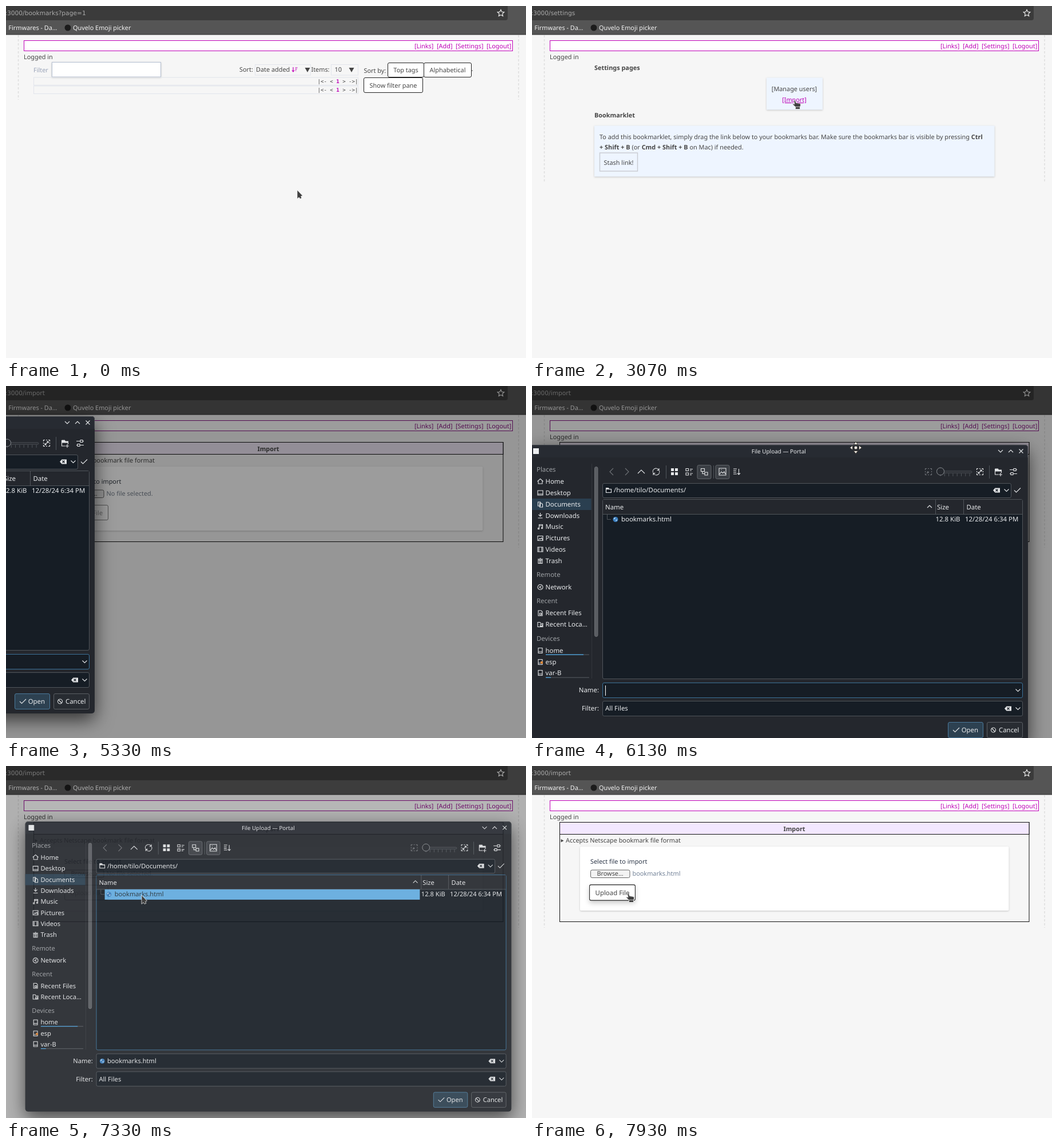
An HTML page for the animation above (8 s loop, 909 by 616 pixels).

```html
<!DOCTYPE html>
<html lang="en">
<head>
<meta charset="utf-8">
<title>Bookmark import</title>
<style>
html, body { margin: 0; width: 100%; height: 100%; overflow: hidden; background: #f6f6f6; }
svg { display: block; font: 10.88px "Noto Sans", sans-serif; fill: #454545; text-rendering: geometricPrecision; }
.url { font: 10.67px "DejaVu Sans", sans-serif; fill: #aaa; }
.mono { font: 9.07px "DejaVu Sans Mono", monospace; }
.b { font-weight: 700; }
.m { fill: #bd00b5; }
.line { fill: none; stroke: #e2e5ec; }
.btn { fill: #fff; stroke: #222; }
.card { filter: drop-shadow(0 1px 1.5px #0003); }
#dialog { font-size: 11.4px; fill: #e9ebed; }
#dialog .dim { fill: #9da0a4; }
.ic { fill: none; stroke: #e4e6e8; stroke-width: 1.1; }
.off { opacity: .4; }
.solid { fill: #e4e6e8; stroke: none; }
.view { fill: #161d25; stroke: #50555b; }
.focus { stroke: #3c7299; }
.sep { stroke: #50555b; fill: none; }
</style>
</head>
<body>
<svg id="stage" width="909" height="616" viewBox="0 0 909 616"></svg>
<script>
const text = (x, y, s, o = '') => `<text x="${x}" y="${y}" ${o}>${s}</text>`;
const rect = (x, y, w, h, o = '') => `<rect x="${x}" y="${y}" width="${w}" height="${h}" ${o}/>`;
const path = (d, o = '') => `<path d="${d}" ${o}/>`;
const icon = (x, y, d, cls = '') => path(d, `transform="translate(${x} ${y})" class="ic ${cls}"`);
const group = (id, ...parts) => `<g id="${id}">${parts.join('')}</g>`;
const end = 'text-anchor="end"', mid = 'text-anchor="middle"', magenta = 'class="m"';

const shape = {
  down: 'M-4-2L0 2 4-2', up: 'M-4 2L0-2 4 2', cross: 'M-3.5-3.5L3.5 3.5M3.5-3.5L-3.5 3.5',
  check: 'M-5.5 0L-2 3.5 5.5-4', arrowDown: 'M-4.5-4H4.5L0 4z',
  folder: 'M-4.5-4h4l1 2h4v6h-9z', page: 'M-3.5-4.5h5l2 2v7h-7z',
  disk: 'M-3.5-4.5h7v9h-7zM-3.5 2h7', no: 'M-4 0a4 4 0 1 0 8 0a4 4 0 1 0-8 0M-3-3L3 3',
  corners: 'M-5.5-3v-2.5h2.5M-1-5.5h2M3-5.5h2.5v2.5M5.5-1v2M5.5 3v2.5h-2.5M1 5.5h-2M-3 5.5h-2.5v-2.5M-5.5 1v-2'
};
const clear = (x, y) => icon(x, y, 'M-6 0L-2.5-4H6V4H-2.5z', 'solid') +
  path('M-1.5-2l4 4m0-4l-4 4', `transform="translate(${x} ${y})" stroke="#1b222a" stroke-width="1.2"`);
const globe = (x, y) => `<circle cx="${x}" cy="${y}" r="4.5" fill="#3b7fc0"/>` +
  path('M-3-2q2-2 3-1l-1 2-2 1zM0 1l3-1q0 2-2 3z', `transform="translate(${x} ${y})" fill="#b9d8f0"`);
const edges = bottom => path(`M21.5 51V${bottom}M896 51V${bottom}`, 'stroke="#dcdcdc" stroke-width="1.4" stroke-dasharray="4 3"');

const chrome = group('chrome',
  rect(0, 0, 909, 50, 'fill="#555"'),
  path('M0 0H877V21q0 4-4 4H0z', 'fill="#3b3b3b"'),
  rect(0, 49.5, 909, 1, 'fill="#2d2d2d"'),
  text(-1.6, 16, '', 'id="url" class="url"'),
  path('M865 6.5l1.8 3.8 4 .5-3 2.8.8 4-3.6-2-3.6 2 .8-4-3-2.8 4-.5z', 'fill="none" stroke="#eee" stroke-width="1.2"'),
  `<g fill="#f4f4f4">${text(-4, 42, '‹')}${text(4.3, 42, 'Firmwares - Da…')}${text(117, 42, 'Quvelo Emoji picker')}</g>`,
  '<circle cx="108" cy="38" r="5.5" fill="#1c1c1c"/>');

const nav = rect(31.5, 60.5, 854, 18, 'fill="#fff" stroke="#c000b8"') +
  [[714, 'Links'], [753, 'Add'], [786, 'Settings'], [840, 'Logout']]
    .map(([x, s]) => text(x, 74, `[${s}]`, `${magenta} id="nav${s}"`)).join('') +
  text(31, 93, 'Logged in');

const pager = y => rect(48.5, y, 567, 13.5, 'class="line"') +
  text(615.5, y + 9.5, '|&lt;- &lt; <tspan class="m b">1</tspan> &gt; -&gt;|', `class="mono" ${end}`);
const button = (x, y, w, h, s) => rect(x, y, w, h, 'rx="2.5" class="btn"') + text(x + w / 2, y + h / 2 + 4, s, mid);

const bookmarks = group('bookmarks', edges(164),
  text(48, 116, 'Filter', 'fill="#99a3b8"'),
  rect(80.5, 98.5, 190, 25.5, 'fill="#fff" stroke="#b6c0d2" class="card"'),
  text(408, 115, 'Sort:'), rect(435.5, 102.5, 97, 18.5, 'class="line"'), text(437, 115, 'Date added'),
  path('M502 107v8m-2-2.5l2 2.5 2-2.5M505.5 108h4m-4 2.5h3m-3 2.5h2', 'fill="none" stroke="#c000b8" stroke-width="1.2"'),
  path(shape.arrowDown, 'transform="translate(527 112)"'),
  text(533.5, 115, 'Items:'), rect(568.5, 102.5, 47, 18.5, 'class="line"'), text(574.5, 115, '10'),
  path(shape.arrowDown, 'transform="translate(604 112)"'),
  pager(125), pager(140),
  text(625.5, 116.5, 'Sort by:'), text(813, 116, '-'),
  button(667.5, 99.5, 63, 25, 'Top tags'), button(730.5, 99.5, 83, 25, 'Alphabetical'),
  button(625.5, 125.5, 103, 26, 'Show filter pane'));

const bold = s => `<tspan class="b">${s}</tspan>`;
const settings = group('settings', edges(308),
  text(109, 112, 'Settings pages', 'class="b"'),
  rect(410, 125.5, 98, 56, 'fill="#eef5ff" class="card"'),
  text(458.5, 149, '[Manage users]', mid), text(458.5, 168, '[Import]', `${magenta} id="importLink" ${mid}`),
  text(109, 195, 'Bookmarklet', 'class="b"'),
  rect(109, 209.5, 699.5, 89, 'fill="#eef5ff" class="card"'),
  text(118, 232.5, 'To add this bookmarklet, simply drag the link below to your bookmarks bar. Make sure the bookmarks bar is visible by pressing ' + bold('Ctrl')),
  text(118, 250.5, bold('+ Shift + B') + ' (or ' + bold('Cmd + Shift + B') + ' on Mac) if needed.'),
  rect(118.5, 257, 66, 32, 'fill="none" stroke="#c9cbd0" stroke-width="1.4"'), text(151.5, 277.5, 'Stash link!', mid));

const importPage = group('import', edges(283),
  rect(48.5, 98.5, 820.5, 174, 'fill="none" stroke="#111"'),
  rect(48.5, 98.5, 820.5, 21, 'fill="#f3e8ff" stroke="#111"'),
  text(458.5, 113.5, 'Import', `class="b" ${mid}`),
  path('M50.5 128l5 2.7-5 2.7z'), text(59, 134, 'Accepts Netscape bookmark file format'),
  rect(84, 141, 749.5, 112, 'rx="2" fill="#fff" class="card"'),
  text(102, 171, 'Select file to import', 'fill="#2d3748"'),
  rect(102.5, 182, 68.5, 13.5, 'rx="2.5" fill="#f3f3f3" stroke="#666"'), text(136.5, 192.3, 'Browse…', mid),
  text(175.5, 192.3, '', 'id="fileName" fill="#718096"'),
  group('upload', rect(102.5, 208.5, 76, 26, 'rx="2.5" class="btn"'), text(140.5, 225.7, 'Upload File', mid)));

// Side bar: [baseline centre, label, icon]; no icon marks a heading.
const places = [
  [146, 'Places'], [167, 'Home', 'M-5 0L0-4.5 5 0M-3.5-1v5h7v-5'], [187, 'Desktop', 'M-4.5-4h9v8h-9zM-4.5 2h9'],
  [207, 'Documents', 'M-4-4h4v7h-4zM-1-2h3l2 2v5h-5z'], [227, 'Downloads', 'M0-5v6m-3-3l3 3 3-3M-4 4h8'],
  [246.5, 'Music', 'M-2 3v-7h6v6M-2-2h6M-4 2h2v2h-2zM2 1h2v2h-2z'], [266.5, 'Pictures', 'M-4.5-4h9v8h-9zM-3 3l2-3 1.5 1.5 2-2.5L4 3'],
  [286, 'Videos', 'M-4.5-4h9v8h-9zM-2.5-4v8M2.5-4v8'], [306, 'Trash', 'M-4.5-3h9M-1-4.5h2M-3.5-1.5h7v6h-7zM-1-1v5M1-1v5'],
  [330.5, 'Remote'], [352, 'Network', 'M-4.5 0a4.5 4.5 0 1 0 9 0a4.5 4.5 0 1 0-9 0M-2 0L2-2M-2 0L2 2'],
  [376.5, 'Recent'], [397.5, 'Recent Files', shape.page + 'M-1 0h3v3h-3z'], [417.5, 'Recent Loca…', shape.folder + 'M0 0h3v3h-3z'],
  [442, 'Devices'], [463, 'home', shape.disk], [483, 'esp', shape.disk], [502, 'var-B', shape.disk]
].map(([y, s, d]) => d ? icon(14.5, y, d) + text(23.5, y + 4, s) : text(8, y + 4, s, 'class="dim"')).join('');
const usage = (y, w) => rect(24, y, 76, 1.3, 'fill="#4c5157"') + rect(24, y, w, 1.3, 'fill="#4aa3df"');
const sep = x => path(`M${x} 139v23`, 'class="sep"');
const pressed = x => rect(x - 12, 138.5, 24, 24, 'rx="2.5" fill="#3a3e44" stroke="#62666b"');
const ticks = Array.from({ length: 8 }, (_, i) => `M${714 + 7.3 * i} 153v5`).join('');

const dialog = group('dialog',
  rect(-4, 103, 871, 520, 'rx="5" fill="#24272d" style="filter:drop-shadow(0 11px 16px #000a)"'),
  path('M-3.5 125V108q0-4.5 4.5-4.5H862q4.5 0 4.5 4.5V125', 'fill="#272b32" stroke="#3d4147"'),
  rect(2, 109, 10, 10, 'fill="#eceef0"'),
  text(431.3, 118, 'File Upload — Portal', `${mid} font-size="9.95"`),
  icon(819, 114, shape.down), icon(837, 114, shape.up), icon(855, 114, shape.cross),
  rect(-4, 197, 107.5, 20, 'fill="#2a3f50"'), places, rect(15, 482, 4, 4, 'fill="#e08a3c"'),
  usage(469.5, 66), usage(509.5, 9), path('M104.5 136V512', 'class="sep" opacity=".35"'),
  rect(109.5, 141.5, 5.5, 297, 'rx="2.7" fill="#5a5d62" stroke="#6b6e73"'),
  icon(139, 150, 'M3-6L-3 0 3 6', 'off'), icon(166, 150, 'M-3-6L3 0-3 6', 'off'), icon(191, 150, 'M-6 3L0-3 6 3'),
  icon(217, 150, 'M-5.5 1.5A5.5 5.5 0 0 1 4.5-3M5.5-1.5A5.5 5.5 0 0 1-4.5 3M5-6v3.5h-3.5M-5 6v-3.5h3.5'),
  sep(234.5), sep(317.5), sep(799.5), pressed(301), pressed(333),
  icon(249, 150, 'M-6-6h5v5h-5zM1-6h5v5h-5zM-6 1h5v5h-5zM1 1h5v5h-5z', 'solid'),
  icon(275, 150, 'M-6-5.5h4.5v4h-4.5zM-6 2h4.5v4h-4.5zM1-4.5h5M1-2h3M1 3h5M1 5.5h3'),
  icon(301, 150, 'M-5.5-5.5h6v5h-6zM1 1h5v5h-5zM-3 0v3.5h4'),
  icon(333, 150, 'M-6-6h12v12h-12zM-5 4l3-4 2.5 2.5L3 0l2 4M-2.5-3.5h1'),
  icon(358, 150, 'M-6-5h6M-6-2h5M-6 1h5M-6 4h6M3.5-5v10m-2.5-2.5L3.5 5l2.5-2.5'),
  icon(693, 150, shape.corners + 'M-3 3L0 0m-2.5 0H0v2.5', 'off'),
  path('M718 149h49q2 0 2 1.5t-2 1.5h-49' + ticks, 'class="sep" stroke="#74787d"'),
  '<circle cx="714" cy="149.5" r="6.5" fill="#24272d" stroke="#8b8f94"/>',
  icon(783, 150, shape.corners + 'M-3 3L3-3m-3 0h3v3M-3 0v3h3'),
  icon(815, 150, 'M-5.5-5h5l1 2h5v5M-5.5-5v10h6M4 2v6M1 5h6'), icon(815, 150, 'M-5.5-5h5l1 2h5v2.5h-11z', 'solid'),
  icon(841, 150, 'M-6-3.5H1M5-3.5h2M-6 3.5h2M0 3.5h7M1-5.5h4v4h-4zM-4 1.5h4v4h-4z'),
  rect(123.5, 170.5, 714, 25, 'rx="2.5" class="view"'),
  icon(134, 182.5, shape.folder), icon(134, 181, 'M-4.5-3h4l1 2h4v1h-9z', 'solid'),
  text(143, 186.5, '/home/tilo/Documents/'), clear(812, 182.5), icon(829.5, 182.5, shape.down), icon(848.5, 182.5, shape.check),
  rect(123.5, 198.5, 734, 314, 'rx="2.5" class="view" id="list"'),
  path('M124 199H857V224H124z', 'fill="#24272d"'), path('M124 224.5H857M705.5 199v25M754.5 199v25', 'class="sep"'),
  text(128, 216, 'Name'), text(708, 216, 'Size'), text(759.5, 216, 'Date'), icon(695, 211, shape.up),
  path('M131.5 225v8.5h6.5', 'class="sep"'), rect(138.5, 224.5, 564.5, 18.5, 'fill="#64b0e6" id="picked"'),
  globe(146, 233.5), text(156, 237, 'bookmarks.html', 'id="row"'),
  text(748.5, 237, '12.8 KiB', end), text(757, 237, '12/28/24 6:34 PM'),
  text(117, 536.5, 'Name:', end), rect(123.5, 519.5, 734, 26, 'rx="2.5" class="view" id="nameBox"'),
  icon(849.5, 532.5, shape.down), rect(128, 524, 1, 18, 'fill="#fff" id="caret"'),
  group('chosen', globe(134, 532.5), text(143, 536.5, 'bookmarks.html'), clear(832, 532.5)),
  text(117, 568.5, 'Filter:', end), rect(123.5, 551.5, 734, 26, 'rx="2.5" class="view"'),
  text(128, 568.5, 'All Files'), clear(832, 564.5), icon(849.5, 564.5, shape.down),
  rect(727.5, 588.5, 61, 27, 'rx="2.5" fill="#2d4151" stroke="#4b7a9c"'), icon(741.5, 602, shape.check), text(750.7, 606, 'Open'),
  rect(795.5, 588.5, 62, 27, 'rx="2.5" fill="#282c32" stroke="#5b5f64"'), icon(806.5, 602, shape.no), text(816, 606, 'Cancel'));

const outline = 'fill="#404040" stroke="#fff" stroke-width=".7" stroke-linejoin="round"';
const cursor = group('cursor',
  group('arrow', path('M0 0V15.5L3.2 12.8 5 15.5 8 14.2 6.5 11.2 9.5 10z', outline)),
  group('hand', path('M-1 .5q1.3-1.3 2.5 0L2.5 4.5 9 5.5q2 .6 1.6 3L9.5 12H2L-3 7.5q-.6-1.8 1-1.5L0 7z', outline) + rect(1.5, 11.5, 8, 4, outline)),
  group('move', [0, 90, 180, 270].map(a => path('M0-10.5L3.8-5.5H-3.8z',
    `transform="rotate(${a})" fill="#f0ece4" stroke="#3a3632"`)).join('') +
    '<circle r="3" fill="#f0ece4" stroke="#3a3632"/>'));

const page = group('page', rect(0, 0, 909, 616, 'fill="#f6f6f6"'), chrome, nav, bookmarks, settings, importPage);
document.getElementById('stage').innerHTML = page + dialog + cursor;

const $ = id => document.getElementById(id);
const show = (id, on) => $(id).style.display = on ? '' : 'none';
const set = (id, key, value) => $(id).setAttribute(key, value);
const ramp = (t, a, b) => Math.min(1, Math.max(0, (t - a) / (b - a)));

// Eased position along [time, x, y] points.
function along(points, t) {
  const i = points.findIndex(p => p[0] > t);
  if (i < 0) return points.at(-1).slice(1);
  if (!i) return points[0].slice(1);
  const [a, b] = [points[i - 1], points[i]], p = ramp(t, a[0], b[0]), k = p * p * (3 - 2 * p);
  return [a[1] + (b[1] - a[1]) * k, a[2] + (b[2] - a[2]) * k];
}
const drag = [[5733, -716, 53], [6133, -4, 103], [6333, 23, 91]];
const pointer = [[333, 509, 322], [1200, 804, 74], [2200, 804, 74], [2933, 459, 165], [3800, 459, 165],
  [4200, 114, 187], [4333, 147, 190], [4933, 147, 190], [5267, -146, 58], [5733, -146, 58],
  [6133, 566, 108], [6333, 593, 96], [6400, 593, 96], [7067, 237, 226], [7333, 237, 226],
  [7667, 245, 257], [7800, 245, 257], [7933, 168, 223]];

const STEP = 200 / 3;
function draw(now) {
  const t = Math.floor((now % 8000 + 5) / STEP) * STEP + .5;
  const page = t < 2000 ? 'bookmarks' : t < 3530 ? 'settings' : 'import';
  for (const id of ['bookmarks', 'settings', 'import']) show(id, id === page);
  $('url').textContent = ':3000/' + page + (page === 'bookmarks' ? '?page=1' : '');
  const underline = on => on ? 'underline' : 'none';
  set('navSettings', 'text-decoration', underline(t > 1190 && t < 2330));
  set('importLink', 'text-decoration', underline(t > 2860));

  const loaded = t > 7390, hover = t > 7860;
  $('fileName').textContent = loaded ? 'bookmarks.html' : 'No file selected.';
  set('upload', 'opacity', loaded ? 1 : .55);
  set('upload', 'transform', hover ? 'translate(140.5 221.5) scale(1.05) translate(-140.5 -221.5)' : '');
  $('upload').style.filter = hover ? 'drop-shadow(0 4px 4px #0003)' : '';

  // The page behind an open dialog loses light and colour.
  const shade = ramp(t, 4890, 5333) * (1 - ramp(t, 7267, 7515));
  $('page').style.filter = shade ? `brightness(${1 - .39 * shade}) saturate(${1 - .4 * shade})` : '';
  const open = ramp(t, 4800, 5100) * (1 - ramp(t, 7297, 7600));
  const [x, y] = along(drag, t);
  show('dialog', open > 0);
  set('dialog', 'opacity', open);
  set('dialog', 'transform', `translate(${x + 435.5} ${y + 260}) scale(${.8 + .2 * open}) translate(-431.5 -363)`);
  const picked = t > 7060;
  show('picked', picked);
  show('chosen', picked);
  show('caret', !picked);
  set('row', 'fill', picked ? '#22303b' : '#e9ebed');
  $('list').classList.toggle('focus', picked);
  $('nameBox').classList.toggle('focus', !picked);

  const [cx, cy] = along(pointer, t);
  set('cursor', 'transform', `translate(${cx} ${cy})`);
  const hand = t > 1730 && t < 2260 || t > 3060 && t < 3860 || t > 7930;
  const move = t > 5730 && t < 6460;
  show('hand', hand);
  show('move', move);
  show('arrow', !hand && !move);
}
const start = performance.now();
(function tick() {
  draw(performance.now() - start);
  requestAnimationFrame(tick);
})();
</script>
</body>
</html>
```
